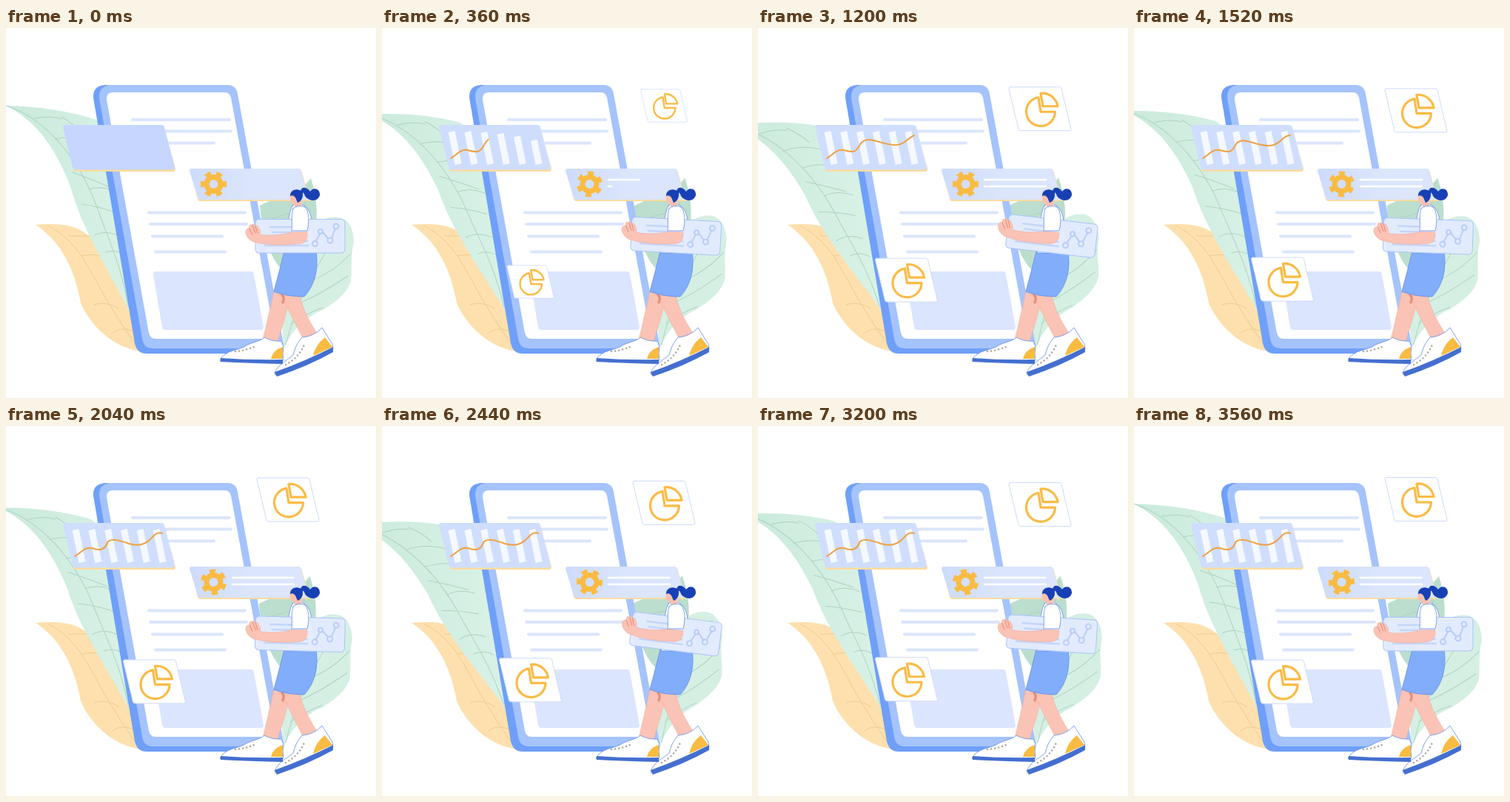
Animation, 500 px wide and 500 px high, one loop 3600 ms. Source, as an HTML page:

```html
<!DOCTYPE html>
<html lang="en">
<head>
<meta charset="utf-8">
<title>Building a mobile page</title>
<style>
  html, body { margin: 0; width: 100%; height: 100%; overflow: hidden; background: #fff; }
  svg { display: block; width: 100vw; height: 100vh; }
  path, line, circle { stroke-linecap: round; stroke-linejoin: round; }
  .vein { fill: none; stroke: #afd3c2; stroke-width: 1; }
  .text { fill: none; stroke: #dbe6fc; stroke-width: 4; }
  .ink { stroke: #5f8be6; stroke-width: .8; }
  .skin { fill: #fac3b5; stroke: #f3ab9b; stroke-width: .6; }
</style>
</head>
<body>
<svg viewBox="0 0 500 500">
  <defs>
    <linearGradient id="mint">
      <stop offset="0" stop-color="#c9eadb"/><stop offset="1" stop-color="#daf2e7"/>
    </linearGradient>
    <linearGradient id="ice">
      <stop offset="0" stop-color="#cddbfb"/><stop offset=".5" stop-color="#dbe5fc"/>
    </linearGradient>
    <g id="pie" fill="#fff">
      <path stroke="#cddbfa" d="M-40-30H26Q28-30 29-28L42 27Q42 29 40 29H-26Q-28 29-29 27L-42-28Q-42-30-40-30Z"/>
      <path fill="none" stroke="#fbbb45" stroke-width="3.2" d="M-2-16A19.500 19.500 0 1 0 20.500 3.500H1ZM1-21.500 4-4H24A21 21 0 0 0 1-21.500Z"/>
    </g>
  </defs>

  <!-- leaves -->
  <path fill="#fde0ae" d="M40 266C75 263 108 266 123 296C135 325 160 350 166 380C172 400 176 425 184 437C145 433 114 402 101 372C92 320 70 285 40 266Z"/>
  <path fill="none" stroke="#efcb8e" d="M58 268C95 286 112 325 132 360S165 412 178 432M84 281H116M103 308Q120 304 133 310M119 374Q135 368 152 379M144 412Q156 403 170 409"/>
  <g id="leftLeaf">
    <path fill="url(#mint)" d="M0 105C45 106 85 112 122 124C185 170 200 290 168 384C135 322 102 270 87 214C66 160 40 125 0 105Z"/>
    <path class="vein" d="M0 105C55 122 100 180 122 240S155 320 165 376M38 122Q60 118 75 123M75 120Q92 130 102 143M66 150Q90 144 120 156M88 176Q115 172 140 182M90 195Q120 206 142 216M112 218Q130 212 150 222M102 238Q125 241 150 250M120 280Q135 272 155 282M135 303Q148 298 162 308"/>
  </g>
  <g id="rightLeaf">
    <path fill="#d5efe3" d="M450 256C420 252 402 280 390 320C375 360 370 400 376 432C385 410 405 390 428 381C440 373 460 362 466 342C468 325 465 310 470 290C470 270 462 258 450 256Z"/>
    <path class="vein" d="M378 428C390 380 415 320 458 268M396 372Q425 360 462 335M410 342Q440 332 466 305M385 400Q405 386 428 378"/>
  </g>
  <g id="darkLeaf">
    <path fill="#bbdece" d="M412 203C395 226 365 228 343 240C348 300 370 330 382 332C418 305 429 255 412 203Z"/>
    <path class="vein" d="M410 210C402 250 390 290 380 328M403 250Q380 248 355 260"/>
  </g>

  <!-- phone -->
  <path fill="#6f9ff8" d="M133 77H290L375 428Q376 440 366 440H190Q177 440 174 426L118 94Q117 79 133 77Z"/>
  <path fill="#a5c3fc" d="M140 77H299Q311 77 313 89L374 422Q375 433 366 433H199Q187 433 184.500 422L126 95Q125 79 140 77Z"/>
  <path fill="#fff" d="M143 87H296Q302 87 304 94L362 410Q364 420 356 420H202Q195 420 193 412L136 97Q135 88 143 87Z"/>
  <path class="text" d="M171 124H302M172 139.500H304M180 155.500H281M193 249.500H323M195 265H325M198 281.500H292M202 302.500H296"/>
  <path fill="#dbe5fd" d="M202 329H331Q334 329 335 333L348 404Q348 408 345 408H215Q212 408 211 404L199 333Q199 329 202 329Z"/>

  <!-- bar chart panel -->
  <path fill="#fbdc9f" d="M80 133H213L229 190Q229 194 226 194H95Q92 194 91 191Z"/>
  <path id="panel" d="M80 131H210Q213 131 214 134L228 188Q228 191.500 225 191.500H94Q91 191.500 90 188L77 134Q77 131 80 131Z"/>
  <g id="bars" stroke="#f5f9ff" stroke-width="9"></g>
  <path id="trend" pathLength="1" fill="none" stroke="#f0a040" stroke-width="2"/>

  <!-- settings panel -->
  <path fill="#fcdca0" d="M250 192H399L411 234H262Q260 234 259 231Z"/>
  <path fill="url(#ice)" d="M251 190H396Q398 190 399 193L409 232H262Q260 232 259 229L248 193Q248 190 251 190Z"/>
  <g id="gear" fill="none" stroke="#fabb42">
    <circle r="9.500" stroke-width="7"/>
    <circle r="14" stroke-width="7" pathLength="12" stroke-dasharray="1 1" stroke-dashoffset=".5" style="stroke-linecap:butt"/>
  </g>
  <g stroke="#fff" stroke-width="2.500">
    <line id="row1" x1="306" x2="306" y1="205" y2="205"/>
    <line id="row2" x1="306" x2="306" y1="214" y2="214"/>
  </g>

  <use id="pieTop" href="#pie"/>
  <use id="pieLow" href="#pie"/>

  <!-- woman -->
  <path class="skin" d="M362 356L384 360C380 385 372 405 367 425L347 422C352 400 357 380 362 356Z"/>
  <path class="skin" d="M372 358L397 360C400 380 412 400 422 415L402 421C392 400 380 380 372 358Z"/>
  <path fill="none" stroke="#e88976" stroke-width="3" d="M373 361Q377 364 374 371"/>
  <g class="ink">
    <path fill="#82adfb" d="M376 302H419C423 330 415 350 403 363C388 363 374 361 362 356C367 338 372 318 376 302Z"/>
    <path fill="#fff" d="M290 447C298 435 313 436 323 430C333 424 343 424 349 418Q360 424 372 423L375 430Q373 440 375 449L290 450Z"/>
    <path fill="#fff" d="M363 466C368 454 380 449 388 442C391 430 395 424 400 418Q416 417 427 405L441 427L442 434C420 447 395 458 365 469Z"/>
  </g>
  <path fill="#fabb42" d="M374 431Q361 435 358 447H374ZM431 418Q418 428 415 443L441 431Z"/>
  <path fill="#446fd0" d="M290 446Q330 449 374 448V454Q330 453 290 451ZM363 465Q405 450 442 431V438Q408 457 366 471Z"/>
  <path fill="none" stroke="#aaa6a0" stroke-width="2.500" stroke-dasharray=".1 5" d="M310 437Q325 436 339 429M378 455Q396 445 403 428"/>
  <path class="ink" fill="#fff" d="M387 240Q394 235 403 240Q412 246 413 262L419 304H377C382 290 378 258 387 240Z"/>
  <path fill="#fac0b0" d="M384 224Q383 234 386 237L390 238V242Q395 244 400 239L398 222Z"/>
  <path fill="#1740b5" d="M384 227C384 217 396 216 401 222C402 230 398 235 394 236L391 229Q388 225 384 227ZM398 221C399 213 407 215 411 221C415 214 425 217 424 226C421 236 409 234 404 227Q403 222 398 221Z"/>
  <g id="held">
    <rect x="337" y="258.500" width="121" height="45.500" rx="5" fill="#e3ecfe" fill-opacity=".96" stroke="#a9c4fb"/>
    <path fill="none" stroke="#c5d5fa" stroke-width="2.500" d="M357 269H386M360 276H386M350 294H408M383 288H407"/>
    <g fill="none" stroke="#b9ccf8" stroke-width="2">
      <path d="M419 288 424 278M428 276 435 284M440 284 445 271"/>
      <circle cx="417.500" cy="291.500" r="3.500"/><circle cx="425" cy="275" r="3"/>
      <circle cx="438" cy="287" r="3.500"/><circle cx="446" cy="268" r="3.500"/>
    </g>
    <path class="skin" d="M407 276C408 288 403 292 392 292C370 294 350 293 340 290C330 290 323 280 324 275Q325 270 329 271Q328 265 332 266Q335 263 336 268Q340 265 341 270Q345 274 343 279C355 281 372 280 387 276Z"/>
    <path fill="none" stroke="#e88976" d="M329 271 333 279M333 267 337 277M337 268 340 277"/>
  </g>
  <path class="ink" fill="#fff" d="M388 244C385 254 387 264 386 274H407C410 264 410 248 404 242Q394 238 388 244Z"/>
</svg>
<script>
const LOOP = 3600;
const $ = id => document.getElementById(id);
const set = (id, name, value) => $(id).setAttribute(name, value);
const progress = (t, start, length) => Math.min(1, Math.max(0, (t - start) / length));
const easeOut = u => 1 - (1 - u) ** 3;
const easeOutBack = u => 1 + (u - 1) ** 2 * (2.70158 * (u - 1) + 1.70158);
const wave = (t, period) => Math.cos(2 * Math.PI * t / period);

const bars = Array.from({ length: 6 }, () => {
  const bar = document.createElementNS('http://www.w3.org/2000/svg', 'path');
  bar.style.strokeLinecap = 'butt';
  return $('bars').appendChild(bar);
});

// The hump flattens and the valley deepens as m goes from 0 to 1.
const trendPath = m => `M93 176C102 171 106 163 116 165C128 169 133 168 138 ${158 - 2 * m}
  C144 ${145 + 6 * m} 155 ${148 + 7 * m} 166 ${151 + 8 * m}
  C178 ${154 + 8 * m} ${190 - 3 * m} ${161 + m} ${201 - 4 * m} ${155 - 4 * m}
  C${207 - 4 * m} ${152 - 8 * m} ${209 - 2 * m} ${149 - 6 * m} 211 145`;

function draw(t) {
  const sway = (1 - wave(t, LOOP / 2)) / 2;
  set('leftLeaf', 'transform', `rotate(${-11 * sway} 165 380)`);
  set('rightLeaf', 'transform', `rotate(${-5 * sway} 375 430)`);
  set('darkLeaf', 'transform', `rotate(${-2 * sway} 375 430)`);
  set('held', 'transform', `rotate(${9 * sway} 398 277)`);
  set('gear', 'transform', `translate(280.5 211) rotate(${360 * t / LOOP})`);

  const bob = wave(t - 1420, 1440);
  const pop = easeOutBack(progress(t, 260, 460));
  set('pieTop', 'transform', `translate(381 ${106 + 6.5 * bob}) scale(${pop})`);
  set('pieLow', 'transform', `translate(200.5 ${343 - 3.2 * bob}) scale(${pop})`);

  const fade = progress(t, 0, 400);
  set('panel', 'fill', `rgb(${198 + 10 * fade},${214 + 8 * fade},${255 - 2 * fade})`);
  bars.forEach((bar, i) => {
    const grow = easeOut(progress(t, 40 + 40 * i, 340));
    const x = 103 + 21.8 * i;
    bar.setAttribute('d', `M${x} 184L${x - 9 * grow} ${184 - 44 * grow}`);
    bar.setAttribute('visibility', grow ? 'visible' : 'hidden');
  });
  const drawn = progress(t, 160, 440);
  set('trend', 'd', trendPath(progress(t, 640, 1260)));
  set('trend', 'stroke-dasharray', `${drawn} 2`);
  set('trend', 'visibility', drawn ? 'visible' : 'hidden');

  [['row1', 160], ['row2', 340]].forEach(([id, start]) => {
    const grow = progress(t, start, 400);
    set(id, 'x2', 306 + 83 * grow);
    set(id, 'visibility', grow ? 'visible' : 'hidden');
  });
}

const begin = performance.now();
function tick() {
  draw((performance.now() - begin) % LOOP);
  requestAnimationFrame(tick);
}
tick();
</script>
</body>
</html>
```
